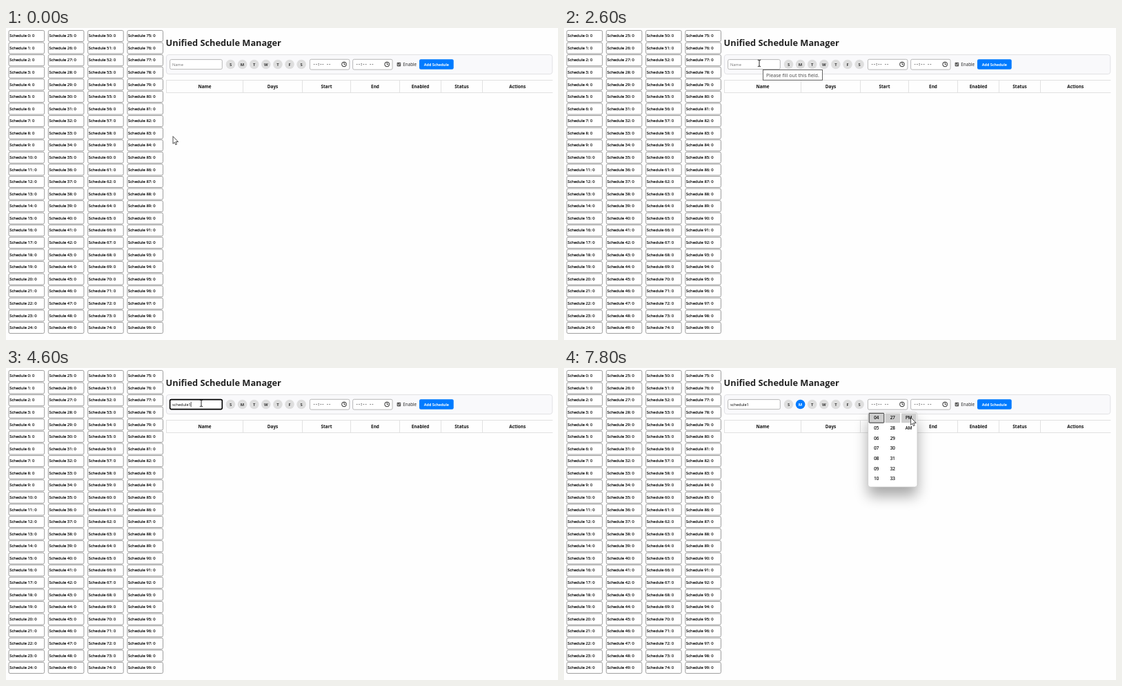
Animation, 800 px wide and 451 px high, one loop 8000 ms. Source, as an HTML page:

```html
<!DOCTYPE html>
<html lang="en">
<head>
<meta charset="utf-8">
<title>Schedule manager</title>
<style>
  html, body { margin: 0; width: 100%; height: 100%; overflow: hidden; background: #fefefe; }
  svg { display: block; width: 100%; height: 100%; font-family: "Open Sans", "Noto Sans", sans-serif; }
  text { white-space: pre; }
</style>
</head>
<body>
<svg id="stage" viewBox="0 0 800 451"></svg>
<script>
const NS = "http://www.w3.org/2000/svg";
const stage = document.getElementById("stage");
const LOOP = 8000, STEP = 200;
const BLUE = "#007bff";

function add(parent, tag, attrs, content) {
  const node = document.createElementNS(NS, tag);
  for (const key in attrs) node.setAttribute(key, attrs[key]);
  if (content !== undefined) node.textContent = content;
  parent.appendChild(node);
  return node;
}
const group = (parent = stage) => add(parent, "g", {});
const box = (parent, x, y, width, height, rx, fill, stroke = "none", sw = 1) =>
  add(parent, "rect", { x, y, width, height, rx, fill, stroke, "stroke-width": sw });
const label = (parent, x, y, size, content, fill = "#222", more = {}) =>
  add(parent, "text", { x, y, "font-size": size, fill, ...more }, content);
const path = (parent, d, stroke, sw = 1, fill = "none") =>
  add(parent, "path", { d, stroke, "stroke-width": sw, fill, "stroke-linejoin": "round", "stroke-linecap": "round" });
const show = (node, on) => node.setAttribute("visibility", on ? "visible" : "hidden");

const bold = { "font-weight": 700 };
const centred = { "text-anchor": "middle" };
const boldCentred = { ...bold, ...centred };
// a hairline outline keeps the smallest text crisp and dark
const crisp = { stroke: "#111", "stroke-width": 0.18 };

function buildCells() {
  for (let i = 0; i < 100; i++) {
    const x = 4 + 57.3 * Math.floor(i / 25), y = 3.5 + 17.58 * (i % 25);
    box(stage, x, y, 51.6, 16, 2, "#fff", "#858585", 0.8);
    label(stage, x + 1.2, y + 9.7, 5.85, `Schedule ${i}: 0`, "#000", crisp);
  }
}

function buildTimeInput(x) {
  box(stage, x, 45.3, 57.4, 14.8, 2, "#fff", "#a6a6a6", 0.8);
  label(stage, x + 4.5, 54.4, 5.4, "--:-- --", "#111", { ...crisp, "font-family": "'DejaVu Sans Mono', monospace" });
  add(stage, "circle", { cx: x + 49.6, cy: 52.5, r: 3.4, fill: "none", stroke: "#111", "stroke-width": 0.9 });
  path(stage, `M${x + 49.6} 50.4V52.7H${x + 51.2}`, "#111", 0.8);
}

function buildTable() {
  const edges = [232.5, 343.5, 429.5, 499.5, 570.5, 630.5, 690.5, 792];
  const heads = ["Name", "Days", "Start", "End", "Enabled", "Status", "Actions"];
  path(stage, "M232.5 75.5H792M232.5 93.5H792", "#dedede", 0.9);
  edges.slice(0, -1).forEach((x, i) => {
    path(stage, `M${x} 75.5V93.5`, "#dedede", 0.9);
    label(stage, (x + edges[i + 1]) / 2, 87.2, 6.4, heads[i], "#111", boldCentred);
  });
}

function buildSavedInfo() {
  const g = group();
  box(g, 262.5, 61.5, 197, 167, 5, "#000").setAttribute("opacity", 0.06);
  box(g, 261.8, 60, 197.4, 166.6, 5, "#e9e9e9", "#c9c9c9", 0.8);
  path(g, "M270.5 60.4L275 56.2L279.5 60.4", "#c9c9c9", 0.8, "#e9e9e9");
  label(g, 270, 75.7, 7.4, "Saved info", "#5a5a5a");
  path(g, "M443.6 70.7L447.8 74.9M447.8 70.7L443.6 74.9", "#333", 1);
  ["test1", "volutes", "XKQDRB", "dovent", "Everard"].forEach((name, i) =>
    label(g, 270.8, 96.5 + 21.4 * i, 7.9, name, "#1a1a1a", { "font-weight": 600 }));
  box(g, 453.2, 84, 2.8, 97, 1.4, "#7b7b7b");
  path(g, "M262 198.2H459", "#d0d0d0", 0.8);
  add(g, "circle", { cx: 276, cy: 209.6, r: 2.2, fill: "none", stroke: "#222", "stroke-width": 0.9 });
  path(g, "M276 217H274.5Q272.3 217 272.3 214.8V213.8H276", "#222", 0.9);
  box(g, 276.2, 213, 5.8, 4.8, 1.2, "#111");
  path(g, "M278 215.4H280.2", "#e9e9e9", 0.7);
  label(g, 286.3, 215.9, 8.35, "Manage personal info", "#222");
  return g;
}

function buildPicker() {
  const g = group();
  const blur = add(add(stage, "defs", {}), "filter", { id: "soft", x: "-60%", y: "-60%", width: "220%", height: "220%" });
  add(blur, "feGaussianBlur", { stdDeviation: 10 });
  const shade = box(g, 440.6, 77, 71.4, 108, 5, "#000");
  shade.setAttribute("filter", "url(#soft)");
  shade.setAttribute("opacity", 0.34);
  box(g, 440.6, 64, 71.4, 108, 3.5, "#fff", "#c4c4c4", 0.7);
  for (let c = 0; c < 3; c++)
    box(g, 442.2 + 23.4 * c, 65.4, 21.6, 13.8, 0.8, "#cecece", c ? "none" : "#222", 0.9);
  const cell = (x, row, content) => label(g, x, 74.3 + 14.65 * row, 6.2, content, "#000", { ...crisp, ...centred });
  for (let row = 0; row < 7; row++) {
    cell(452.8, row, String(4 + row).padStart(2, "0"));
    cell(476.2, row, 27 + row);
  }
  cell(499.6, 0, "PM");
  cell(499.6, 1, "AM");
  return g;
}

buildCells();
label(stage, 231.6, 26, 12.8, "Unified Schedule Manager", "#222", bold);
box(stage, 232.4, 38.6, 559.4, 28, 3.5, "#f9f9fb", "#dfdfe3", 0.9);

const nameBox = box(stage, 237.6, 45.6, 75.7, 14, 2, "#fff");
const nameText = label(stage, 240.9, 54.5, 5.7, "");
const caret = path(stage, "M0 49.2V56", "#111", 0.7);

const days = [..."SMTWTFS"].map((day, i) => {
  const x = 325.5 + 17.1 * i;
  return {
    disc: add(stage, "circle", { cx: x, cy: 52.5, r: 6.8 }),
    text: label(stage, x, 54.7, 5.8, day, "#333", boldCentred)
  };
});
buildTimeInput(440.4);
buildTimeInput(502.6);
box(stage, 566.6, 49.8, 5.6, 5.6, 1, "#5c5c5c");
path(stage, "M567.9 52.7L569 53.9L571 51.3", "#fff", 0.8);
label(stage, 575.3, 54.9, 6.3, "Enable", "#222");
box(stage, 599, 45.2, 49.7, 14.6, 2.2, BLUE);
label(stage, 623.9, 54.6, 5.4, "Add Schedule", "#fff", boldCentred);
buildTable();

const tip = group();
box(tip, 288.5, 60.5, 86, 14.8, 0, "#fff", "#555", 0.9);
label(tip, 293, 70.6, 7.2, "Please fill out this field.", "#444");
const savedInfo = buildSavedInfo();
const picker = buildPicker();

// Pointer shapes, each drawn around its hot spot
const pointers = { arrow: group(), beam: group(), hand: group() };
path(pointers.arrow, "M0 0V10.3L2.3 8.2L3.9 11.8L5.6 11L4 7.5H7.2Z", "#222", 0.8, "#fff");
path(pointers.beam, "M-1.8 -4.8Q0 -4.8 0 -3.8Q0 -4.8 1.8 -4.8M0 -3.8V3.8M-1.8 4.8Q0 4.8 0 3.8Q0 4.8 1.8 4.8", "#111", 0.9);
path(pointers.hand, "M-1.2 .8Q-1.2 -.4 0 -.4Q1.1 -.4 1.1 .8V5Q2.2 4.2 3.1 5.3Q4.3 4.6 5.1 5.8Q6.8 5.4 6.9 7.2V10.4Q6.9 12.4 5.8 13.2V14.5H-.2V13.4L-3.2 9.4Q-3.8 8 -2.6 7.8L-1.2 9Z", "#222", 0.9, "#fff");
path(pointers.hand, "M1.1 5V7.5M3.1 5.5V7.8M5.1 6V8", "#222", 0.6);

// time, x, y, shape; each pose holds until the next
const track = [
  [0, 242, 157, "arrow"], [200, 190, 214, "beam"], [400, 82, 262, "beam"], [600, 14, 150, "beam"],
  [800, 27.2, 45.5, "beam"], [1000, 50, 17, "beam"], [1200, 86, 62, "beam"],
  [1400, 120, 150, "beam"], [1600, 178, 120, "beam"], [1800, 202, 62, "beam"],
  [2000, 234, 30, "arrow"], [2200, 270, 46, "beam"], [2400, 283, 51, "beam"],
  [5200, 290, 52, "beam"], [5400, 312, 54, "beam"], [5600, 332, 56, "hand"], [5800, 342, 55, "hand"],
  [6400, 358, 57, "hand"], [6600, 398, 57, "hand"], [6800, 454, 55, "arrow"], [7000, 488, 53, "arrow"],
  [7200, 490, 54, "arrow"], [7400, 468, 86, "arrow"], [7600, 484, 80, "arrow"], [7800, 502.6, 72, "arrow"]
];
const word = "schedule1";

function draw(time) {
  const t = Math.floor((time % LOOP) / STEP) * STEP;
  const within = (from, to) => t >= from && t < to;

  const focused = within(2800, 6000);
  nameBox.setAttribute("stroke", focused ? "#000" : "#a6a6a6");
  nameBox.setAttribute("stroke-width", focused ? 1.6 : 0.8);

  const typed = t < 3800 ? "" : word.slice(0, 2 * ((t - 3800) / STEP + 1));
  nameText.textContent = typed || "Name";
  nameText.setAttribute("fill", typed ? "#000" : "#757575");
  show(caret, focused && typed);
  if (typed) caret.setAttribute("transform", `translate(${241.2 + nameText.getComputedTextLength()})`);

  days.forEach(({ disc, text }, i) => {
    const on = i === 1 && t >= 6200;
    disc.setAttribute("fill", on ? BLUE : "#dedede");
    text.setAttribute("fill", on ? "#fff" : "#333");
  });

  show(tip, within(2600, 2800));
  show(savedInfo, within(2800, 3800));
  show(picker, t >= 7200);

  const [, x, y, shape] = track.findLast(pose => pose[0] <= t);
  for (const name in pointers) show(pointers[name], name === shape);
  pointers[shape].setAttribute("transform", `translate(${x} ${y})`);
}

const start = performance.now();
function tick() {
  draw(performance.now() - start);
  requestAnimationFrame(tick);
}
tick();
</script>
</body>
</html>
```
